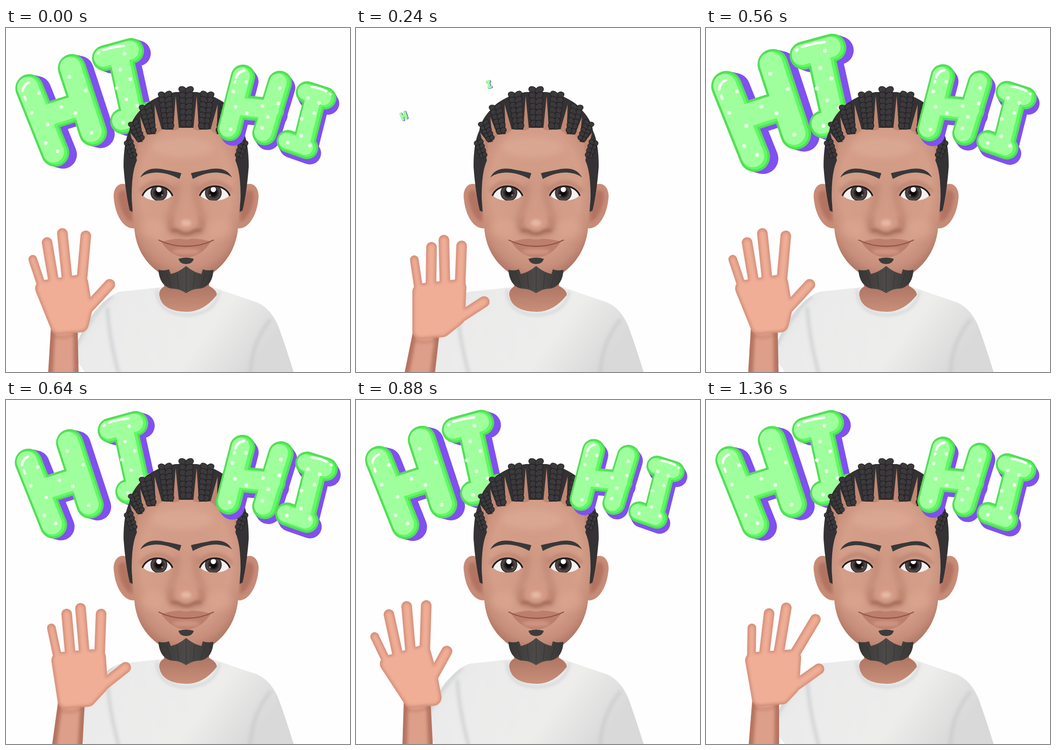
Recreate the animation shown at these times as an HTML page. Size 720 by 720 pixels, loop 1.44 s.

```html
<!DOCTYPE html>
<html lang="en">
<head>
<meta charset="utf-8">
<title>Waving hello</title>
<style>
  html, body { margin: 0; width: 100%; height: 100%; overflow: hidden; background: #fefefe; }
  svg { display: block; width: 100vw; height: 100vh; }
  .round { fill: none; stroke-linecap: round; stroke-linejoin: round; }
</style>
</head>
<body>
<svg viewBox="0 0 720 720">
  <defs>
    <radialGradient id="skin" gradientUnits="userSpaceOnUse" cx="377" cy="335" r="200" gradientTransform="matrix(.72 0 0 1 105 0)">
      <stop offset="0" stop-color="#d19a85"/><stop offset=".65" stop-color="#d49e89"/>
      <stop offset=".85" stop-color="#c68e7a"/><stop offset="1" stop-color="#a9705f"/>
    </radialGradient>
    <linearGradient id="neck" x2="0" y2="1">
      <stop offset="0" stop-color="#9a6452"/><stop offset="1" stop-color="#c98f7b"/>
    </linearGradient>
    <linearGradient id="cloth" x2="1" y2=".3">
      <stop offset="0" stop-color="#dfe1e3"/><stop offset=".25" stop-color="#ebebeb"/>
      <stop offset=".7" stop-color="#ededec"/><stop offset="1" stop-color="#d9d9d9"/>
    </linearGradient>
    <linearGradient id="beard" x2="1">
      <stop offset="0" stop-color="#373635"/><stop offset=".5" stop-color="#4d4b49"/><stop offset="1" stop-color="#373635"/>
    </linearGradient>
    <radialGradient id="iris">
      <stop offset=".3" stop-color="#0c0a0c"/><stop offset=".5" stop-color="#2c2626"/>
      <stop offset=".8" stop-color="#5a4d4b"/><stop offset="1" stop-color="#241e1f"/>
    </radialGradient>
    <filter id="soft" x="-50%" y="-50%" width="200%" height="200%"><feGaussianBlur stdDeviation="7"/></filter>
    <filter id="blur" filterUnits="userSpaceOnUse" x="0" y="0" width="720" height="720"><feGaussianBlur stdDeviation="3"/></filter>
    <clipPath id="opening"><path id="eyeShape"/></clipPath>
    <clipPath id="shirtClip"><use href="#shirt"/></clipPath>

    <g id="ear">
      <path d="M252 328C236 321 222 336 226 360C230 396 249 423 270 419L266 370Z" fill="#c78c78"/>
      <path d="M250 340C236 336 232 350 238 368C243 388 252 402 264 406L264 372Z" fill="#ac6c5a" filter="url(#blur)" opacity=".75"/>
    </g>
    <g id="hair">
      <path fill="#343234" d="M378 134H355L330 139Q295 154 285 168Q262 190 258 215Q246 240 246 290Q250 345 259 382L265 385Q259 310 274 277V240L287 238L295 223L313 222L325 212L349 213L362 209H378Z"/>
      <path fill="#bf8772" d="M355 142L350 215L362 212ZM311 160L313 224L326 213ZM281 186L286 240L296 224ZM260 219L274 277L276 239Z"/>
      <g id="braids" fill="#3b393b" stroke="#1d1b1d"></g>
    </g>
    <g id="eye">
      <path d="M283 340Q316 308 349 338" class="round" stroke="#a97260" stroke-width="9" opacity=".45" filter="url(#blur)"/>
      <g clip-path="url(#opening)">
        <path d="M280 325h75v40h-75Z" fill="#f3f0ef"/>
        <circle cx="320" cy="345" r="17.5" fill="url(#iris)"/>
        <circle cx="320" cy="338" r="5.5" fill="#fff"/>
        <circle cx="327" cy="350" r="2" fill="#8b7c78"/>
      </g>
      <path id="lid" class="round" stroke="#211c1d" stroke-width="3.5"/>
    </g>
    <path id="brow" fill="#37383a" d="M281 313C289 297 304 292 325 295C344 299 358 301 367 304L363 316C345 306 325 301 308 303C297 304 288 307 281 313Z"/>
  </defs>

  <g id="leftWord"></g>

  <path id="shirt" fill="url(#cloth)" d="M331 542L238 552Q216 558 185 594Q157 632 148 662L147 695L165 720H602Q586 668 571 627Q556 588 525 574Q470 556 427 540Z"/>
  <g clip-path="url(#shirtClip)">
    <g class="round" stroke="#c3c5c8" stroke-width="7" filter="url(#blur)" opacity=".6">
      <path d="M212 588Q216 650 236 724M552 612Q514 660 511 724M220 562Q180 600 148 662"/>
    </g>
    <path d="M316 549Q318 598 378 601Q438 598 446 552" class="round" stroke="#cdcfd0" stroke-width="4" filter="url(#blur)"/>
  </g>
  <path fill="url(#neck)" d="M331 500V541Q319 548 321 560Q326 593 378 594Q414 594 441 559Q442 549 425 540V500Z"/>

  <use href="#ear"/><use href="#ear" transform="translate(754) scale(-1 1)"/>
  <path fill="url(#skin)" d="M268 245C275 190 310 165 377 160C444 165 479 190 486 245C493 300 492 360 486 405C487 445 470 485 435 511Q405 542 377 544Q349 542 319 511C284 485 268 450 268 405C262 360 261 300 268 245Z"/>
  <g filter="url(#soft)">
    <ellipse cx="370" cy="250" rx="64" ry="22" fill="#deae9a" opacity=".6"/>
    <ellipse cx="307" cy="420" rx="25" ry="20" fill="#dca58f" opacity=".6"/>
    <ellipse cx="447" cy="420" rx="25" ry="20" fill="#dca58f" opacity=".6"/>
    <path d="M358 328Q357 370 338 402M396 328Q398 370 416 402" class="round" stroke="#ab735f" stroke-width="10" opacity=".5"/>
    <ellipse cx="377" cy="417" rx="39" ry="17" fill="#9b614f" opacity=".65"/>
  </g>
  <g id="nose" filter="url(#blur)">
    <ellipse cx="354" cy="408" rx="14" ry="14" fill="#c28872"/>
    <ellipse cx="400" cy="408" rx="14" ry="14" fill="#c28872"/>
    <ellipse cx="377" cy="405" rx="25" ry="21" fill="#d39a85"/>
    <ellipse cx="377" cy="408" rx="11" ry="7" fill="#e7b8a6"/>
    <path d="M347 424Q360 421 367 428Q377 433 387 428Q395 421 408 424" class="round" stroke="#85503f" stroke-width="3"/>
  </g>

  <use href="#hair"/><use href="#hair" transform="translate(754) scale(-1 1)"/>
  <g id="midBraid" fill="#3b393b" stroke="#1d1b1d"></g>
  <use href="#eye"/><use href="#eye" transform="translate(754) scale(-1 1)"/>
  <g id="brows"><use href="#brow"/><use href="#brow" transform="translate(754) scale(-1 1)"/></g>

  <path fill="#bd7f6d" d="M325 448Q350 440 365 441Q377 444 389 441Q404 440 429 447Q408 480 377 480Q347 480 325 448Z"/>
  <ellipse cx="377" cy="468" rx="29" ry="6" fill="#d09582" filter="url(#blur)"/>
  <path d="M320 444Q346 457 377 457Q408 457 434 444" class="round" stroke="#8f5546" stroke-width="2.5"/>
  <path fill="#3d3c3c" d="M361 483Q377 478 393 483Q390 494 377 494Q364 494 361 483Z"/>
  <path fill="url(#beard)" d="M319 506Q331 509 341 505L345 515Q362 511 377 498Q392 511 409 515L412 505Q422 509 434 506Q433 538 409 545L399 546Q389 547 377 555Q365 547 354 546L344 545Q321 538 319 506Z"/>
  <path d="M377 502V550M358 514L361 544M395 514L392 544M336 514L345 540M417 514L408 540" class="round" stroke="#343331" stroke-width="1.5" opacity=".7"/>

  <g id="rightWord"></g>
  <g id="hand" class="round"></g>
</svg>

<script>
const $ = id => document.getElementById(id);
const STEP = 80, STEPS = 18;
const mix = (a, b, t) => a + (b - a) * t;

function braid(x0, y0, x1, y1, width, rows) {
  const turn = Math.atan2(x0 - x1, y1 - y0) * 180 / Math.PI;
  const length = Math.hypot(x1 - x0, y1 - y0), gap = length / (rows - 1);
  let out = `<g transform="translate(${x0} ${y0}) rotate(${turn})">`;
  for (let i = 0; i < rows; i++) {
    const w = width * (1 - .25 * i / rows);
    for (const side of [-1, 1])
      out += `<ellipse rx="${w * .33}" ry="${gap * .6}" transform="translate(${side * w * .23} ${i * gap}) rotate(${side * -32})"/>`;
  }
  return out + '</g>';
}
$('braids').innerHTML = braid(333, 140, 340, 205, 27, 7) + braid(292, 166, 304, 215, 25, 6) +
  braid(267, 200, 281, 231, 21, 5) + braid(257, 240, 266, 266, 18, 4);
$('midBraid').innerHTML = braid(377, 130, 377, 200, 29, 7);

// Bubble letters: center, drift while small, stroke path, gloss and dots
const letters = [
  { word: 'leftWord', center: [116, 172], drift: [-16, 12], width: 59, shadow: [16, 4],
    path: 'M49 126L103 261M138 84L182 218M78 188L160 162',
    gloss: 'M35 132Q36 119 48 114M39 144L41 150',
    dots: [69,136, 54,177, 87,202, 83,241, 108,258, 133,102, 167,131, 116,165, 145,178, 179,219] },
  { word: 'leftWord', center: [236, 122], drift: [41, -4], width: 54, shadow: [14, 5],
    path: 'M207 63L262 48M240 62L267 185M245 195L300 181',
    gloss: 'M204 46Q225 39 247 37M195 51L193 53',
    dots: [248,54, 239,87, 260,107, 232,126, 252,149, 275,163, 245,198] },
  { word: 'rightWord', center: [521, 161], drift: [2, 7], width: 51, shadow: [7, 10],
    path: 'M496 102L468 211M573 115L541 220M483 165L557 172',
    gloss: 'M482 104Q485 92 499 89M480 112L479 114',
    dots: [503,113, 476,133, 481,165, 504,178, 537,163, 573,126, 570,158, 548,186, 470,212, 536,209] },
  { word: 'rightWord', center: [630, 193], drift: [2, 8], width: 47, shadow: [6, 11],
    path: 'M630 135L668 147M648 143L623 243M590 237L630 251',
    gloss: 'M640 123Q656 125 670 132M678 138L679 139',
    dots: [632,147, 655,157, 645,178, 619,190, 618,226, 590,240, 636,246] }
];
for (const letter of letters) {
  const { path, width, shadow: [sx, sy], gloss, dots } = letter;
  const layer = (color, w, x = 0, y = 0) =>
    `<path d="${path}" stroke="${color}" stroke-width="${w}" transform="translate(${x} ${y})"/>`;
  let art = layer('#8050f0', width, sx / 2, sy / 2) + layer('#8050f0', width, sx, sy) +
    layer('#54de58', width) + layer('#5efb62', width - 9) + layer('#a0ff9d', width - 15, -3.5, -1.5) +
    `<path d="${gloss}" stroke="#fff" stroke-width="5"/>`;
  for (let i = 0; i < dots.length; i += 2)
    art += `<circle cx="${dots[i]}" cy="${dots[i + 1]}" r="3.7" fill="#efffed"/>`;
  letter.node = document.createElementNS('http://www.w3.org/2000/svg', 'g');
  letter.node.setAttribute('class', 'round');
  letter.node.innerHTML = art;
  $(letter.word).append(letter.node);
}

// Springy pop-in, one entry per step after a word appears
const pops = {
  leftWord: { start: 3, scale: [.09, .6, 1.02, 1.12, 1.09, .97, .955, .985, 1.005, 1.01],
              drift: [1, .5, 0, 0, 0, .25, .15, .05] },
  rightWord: { start: 5, scale: [.11, .6, 1.01, 1.045, 1.04, .97, .94, .965, .99], drift: [1, .4] }
};

function drawLetters(step) {
  for (const { word, center: [cx, cy], drift: [dx, dy], node } of letters) {
    const pop = pops[word], k = step - pop.start;
    const size = step === 0 ? 1 : k < 0 ? 0 : pop.scale[k] ?? 1;
    const away = k < 0 ? 0 : pop.drift[k] ?? 0;
    node.setAttribute('display', size ? 'inline' : 'none');
    node.setAttribute('transform',
      `translate(${cx + dx * away} ${cy + dy * away}) scale(${size}) translate(${-cx} ${-cy})`);
  }
}

// Hand poses: arm x, wrist, little and index knuckles, four fingertips, thumb base and tip
const poses = {
  A: [120, 122,640, 74,538, 159,525, 56,484, 86,449, 118,430, 167,435, 170,588, 217,537],
  L: [129, 128,643, 63,545, 144,522, 39,495, 69,449, 106,432, 147,430, 160,580, 190,526],
  B: [128, 137,645, 108,538, 196,530, 95,477, 127,448, 156,436, 199,448, 202,598, 250,560],
  C: [133, 147,650, 131,545, 218,535, 122,485, 158,459, 184,444, 221,456, 217,606, 268,573],
  D: [121, 133,635, 135,525, 220,537, 155,458, 200,441, 233,440, 280,480, 203,602, 259,581],
  E: [121, 125,640, 95,538, 186,531, 96,477, 132,447, 168,435, 229,459, 184,600, 236,563]
};
const wave = [[0,'A'], [1,'L'], [2,'B'], [3,'C'], [5,'D'], [6,'E'], [7,'A'], [8,'B'], [9,'C'],
              [10,'E'], [11,'L'], [12,'A'], [13,'B'], [14,'C'], [16,'D'], [17,'E'], [18,'A']];

function drawHand(step) {
  const i = wave.findLastIndex(([at]) => at <= step);
  const [from, a] = wave[i], [to, b] = wave[i + 1];
  const [armX, wx, wy, px, py, ix, iy, ...rest] =
    poses[a].map((v, j) => mix(v, poses[b][j], (step - from) / (to - from)));
  const fingers = [0, 1, 2, 3].map(n => {
    const lift = n % 3 ? 6 : 0;
    return [mix(px, ix, n / 3) - lift / 2, mix(py, iy, n / 3) - lift, rest[2 * n], rest[2 * n + 1], n ? 22 : 18];
  });
  fingers.push([...rest.slice(8), 23]);
  const line = ([x, y, tx, ty, w], color, inset) =>
    `<path d="M${x} ${y}L${tx} ${ty}" stroke="${color}" stroke-width="${w - inset}"/>`;
  const palm = (color, w) => `<path fill="${color}" stroke="${color}" stroke-width="${w}" stroke-linejoin="round"
    d="M${px + 4} ${py + 7}L${ix - 4} ${iy + 8}L${rest[8] - 6} ${rest[9]}L${wx + 34} ${wy - 20}L${wx - 12} ${wy - 16}Z"/>`;
  const arm = (color, wTop, wEnd) => `<path fill="${color}"
    d="M${wx - wTop} ${wy - 14}L${armX - wEnd} 725H${armX + wEnd}L${wx + wTop} ${wy - 14}Z"/>`;
  const layer = (color, inset) => palm(color, 34 - inset) + fingers.map(f => line(f, color, inset)).join('');
  $('hand').innerHTML = arm('#b67461', 28, 32) +
    `<g filter="url(#blur)">${arm('#dd9f8a', 19, 22)}</g>` +
    layer('#d08c76', 0) + `<g filter="url(#blur)">${layer('#f0ae97', 7)}</g>` +
    `<path d="M${wx - 22} ${wy + 5}Q${wx} ${wy + 12} ${wx + 24} ${wy}" stroke="#a9634f" stroke-width="4" opacity=".45" filter="url(#blur)"/>`;
}

const lids = { 12: .8, 13: .3, 14: 0, 15: .1, 16: .5, 17: .85 };

function drawEyes(step) {
  const open = lids[step] ?? 1;
  const upper = `M286 350C296 ${mix(358, 325, open)} 338 ${mix(360, 325, open)} 348 350`;
  $('eyeShape').setAttribute('d', upper + 'C338 364 299 366 286 350Z');
  $('lid').setAttribute('d', upper);
  $('brows').setAttribute('transform', `translate(0 ${8 * (1 - open)})`);
}

let shown = -1;
function frame(now) {
  const step = Math.floor(now / STEP) % STEPS;
  if (step !== shown) {
    shown = step;
    drawLetters(step);
    drawHand(step);
    drawEyes(step);
  }
  requestAnimationFrame(frame);
}
frame(0);
</script>
</body>
</html>
```
